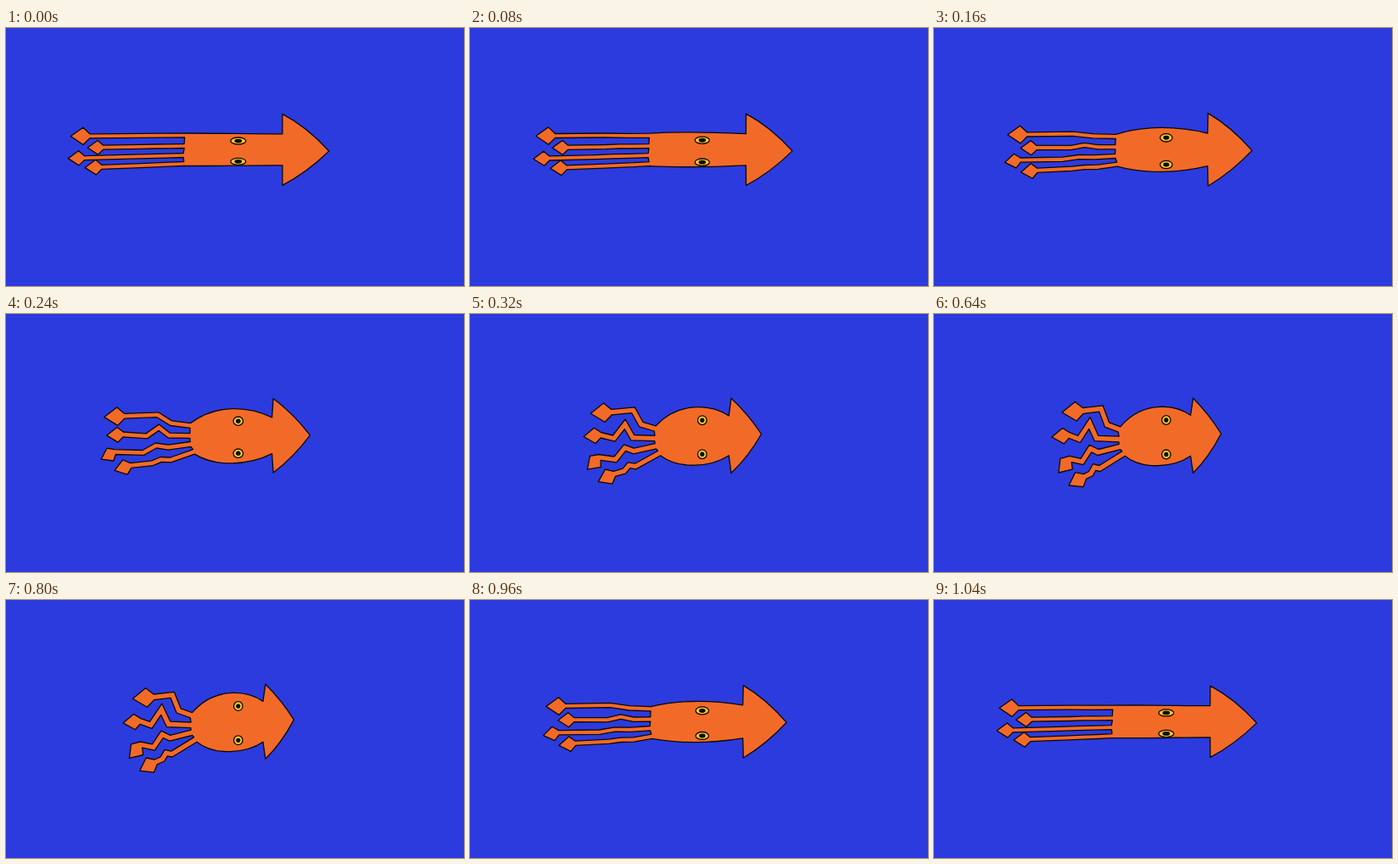
Animation, 540 px wide and 304 px high, one loop 1.12 s. Source, as an HTML page:

```html
<!DOCTYPE html>
<html lang="en">
<head>
<meta charset="utf-8">
<title>Swimming squid</title>
<style>
  html, body { margin: 0; width: 100%; height: 100%; overflow: hidden; background: #2c3bdd; }
  svg { display: block; width: 100%; height: 100%; }
</style>
</head>
<body>
<svg viewBox="0 0 540 304">
  <rect width="540" height="304" fill="#2c3bdd"/>
  <g id="squid" stroke="#0b0806" stroke-width="1.3" stroke-linejoin="round">
    <path id="skin" fill="#f26a28"/>
  </g>
</svg>
<script>
const LOOP = 1120, STEP = 80, AXIS = 143.3;

// Stretched arms are straight (root to tip); bunched arms run root, knees, neck, tip.
const arms = [
  { root: [210.5, 126.5], tip: [76, 127.5],
    bent: [[218.5, 136], [204, 130.5], [197, 111.5], [176, 114], [151, 116]] },
  { root: [210, 139], tip: [96, 141],
    bent: [[218, 147.5], [191.5, 146.5], [183.5, 128.5], [171, 147.5], [159.5, 143], [139, 145]] },
  { root: [209, 150], tip: [73, 153.5],
    bent: [[219, 156.5], [193.5, 163], [184.5, 158.5], [174.5, 174], [161, 171], [147, 187]] },
  { root: [209.5, 160], tip: [93, 164.5],
    bent: [[223.5, 164.5], [195.5, 182], [189, 180.5], [185, 188], [178, 191.5], [159, 202]] }
];

const mix = (a, b, k) => a + (b - a) * k;
const mixPt = (p, q, k) => [mix(p[0], q[0], k), mix(p[1], q[1], k)];
const rise = (t, mid, width) => 1 / (1 + Math.exp((mid - t) / width));
const text = p => p.map(v => v.toFixed(1)).join(" ");

// Unit normal on the upper side when walking from root to tip.
function normal(a, b) {
  const dx = b[0] - a[0], dy = b[1] - a[1], len = Math.hypot(dx, dy);
  return [-dy / len, dx / len];
}

function straighten({ root, tip, bent }) {
  const n = bent.length - 2, [neck, end] = bent.slice(-2);
  const head = .9 * Math.hypot(end[0] - neck[0], end[1] - neck[1]);
  const base = mixPt(tip, root, head / (root[0] - tip[0]));
  return bent.map((_, i) => i > n ? tip : i === n ? base : mixPt(root, base, .7 * i / n));
}
for (const arm of arms) arm.straight = straighten(arm);

function armOutline(arm, pull, bulge) {
  const line = arm.bent.map((p, i) => mixPt(arm.straight[i], p, pull));
  line[0][0] = mix(arm.root[0], arm.bent[0][0], bulge);
  const half = mix(2.5, 3.3, pull), last = line.length - 1;
  const upper = [], lower = [];
  const widen = (p, m, k) => {
    upper.push([p[0] + m[0] * k, p[1] + m[1] * k]);
    lower.unshift([p[0] - m[0] * k, p[1] - m[1] * k]);
  };
  for (let i = 0; i < last; i++) {
    const out = normal(line[i], line[i + 1]);
    const back = i ? normal(line[i - 1], line[i]) : out;
    const m = [out[0] + back[0], out[1] + back[1]];
    widen(line[i], m, 2 * half / Math.max(.8, m[0] ** 2 + m[1] ** 2));
  }
  const neck = line[last - 1], tip = line[last];
  const size = Math.hypot(tip[0] - neck[0], tip[1] - neck[1]);
  widen(mixPt(neck, tip, .35), normal(neck, tip), .45 * size);
  return [...upper, tip, ...lower];
}

function bodyPath(start, pull, bulge) {
  const at = (x, h) => side => text([x, AXIS + side * h]);
  const collar = at(mix(326, 302.5, pull), mix(18.5, 24, pull));
  const wing = at(mix(326, 305.5, pull), mix(42, 44, bulge));
  const curve = at(mix(355, 324.5, pull), mix(27, 25, pull));
  const front = at(mix(290, 282.5, pull), mix(18, 38, bulge));
  const rear = at(mix(250, 245, pull), mix(19, 40.5, bulge));
  const nose = text([mix(381, 338.5, pull), mix(145, 141, pull)]);
  return `C${rear(1)} ${front(1)} ${collar(1)}L${wing(1)}Q${curve(1)} ${nose}` +
    `Q${curve(-1)} ${wing(-1)}L${collar(-1)}C${front(-1)} ${rear(-1)} ${text(start)}Z`;
}

function oval(fill) {
  const el = document.createElementNS("http://www.w3.org/2000/svg", "ellipse");
  el.setAttribute("fill", fill);
  document.getElementById("squid").append(el);
  return (cx, cy, rx, ry) => {
    for (const [k, v] of Object.entries({ cx, cy, rx, ry })) el.setAttribute(k, v.toFixed(2));
  };
}

const skin = document.getElementById("skin");
const eyes = [-1, 1].map(side => ({ side, ball: oval("#f6c92a"), pupil: oval("#0b0806") }));

function draw(ms) {
  const t = Math.floor((ms % LOOP) / STEP) * STEP;
  const pull = rise(t, 235, 42) * (1 - rise(t, 915, 30));
  const bulge = rise(t, 165, 42) * (1 - rise(t, 940, 30));

  const limbs = arms.flatMap(arm => armOutline(arm, pull, bulge));
  skin.setAttribute("d", "M" + limbs.map(text).join("L") + bodyPath(limbs[0], pull, bulge));

  for (const { side, ball, pupil } of eyes) {
    const y = 145.2 + side * mix(12, 20.2, bulge);
    ball(273.8, y, mix(9, 5.2, bulge), mix(4, 5.4, bulge));
    pupil(273.8, y, mix(3.8, 1.9, bulge), mix(1.7, 2, bulge));
  }
}

const start = performance.now();
function tick() {
  draw(performance.now() - start);
  requestAnimationFrame(tick);
}
draw(0);
requestAnimationFrame(tick);
</script>
</body>
</html>
```
